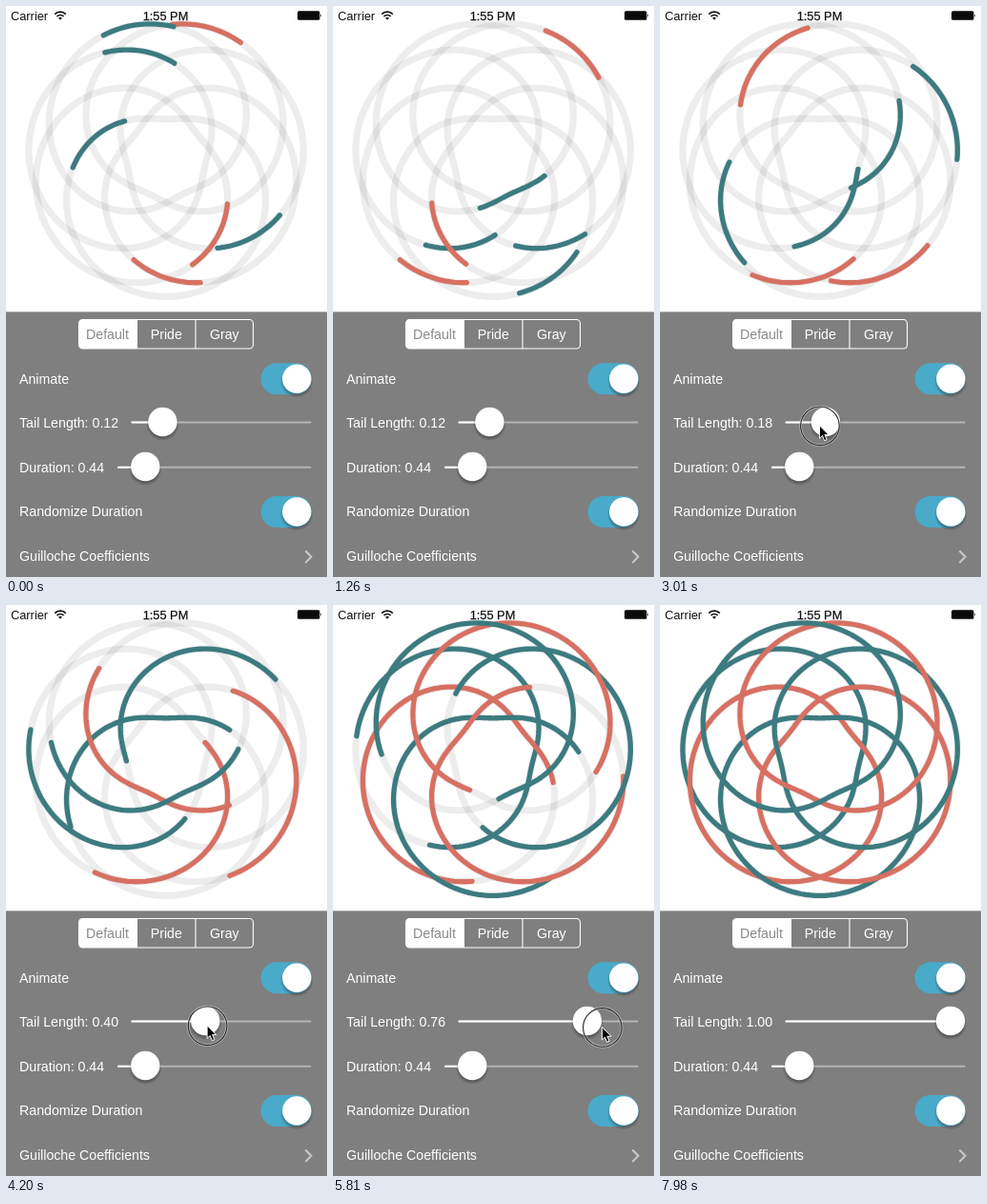
An HTML page for the animation above (8000 ms loop, 337 px wide and 600 px high).

```html
<!DOCTYPE html>
<html lang="en">
<head>
<meta charset="utf-8">
<title>Guilloche spinner</title>
<style>
  html, body { margin: 0; width: 100%; height: 100%; overflow: hidden; background: #fff; }
  svg { display: block; width: 337px; height: 600px; }
  text { font: 14.2px "Liberation Sans", Arial, sans-serif; fill: #fff; }
  .bar { font-size: 12.8px; fill: #111; }
  .mid { text-anchor: middle; }
  .base { fill: none; stroke: #000; stroke-opacity: .072; stroke-width: 7.2; }
  .tail { fill: none; stroke-width: 5.3; stroke-linecap: round; stroke-linejoin: round; }
  .track { stroke: #b5b5b5; stroke-width: 2.1; stroke-linecap: round; }
  .on { stroke: #fff; }
</style>
</head>
<body>
<svg viewBox="0 0 337 600">
  <defs>
    <radialGradient id="shade">
      <stop offset=".78" stop-opacity=".3"/>
      <stop offset="1" stop-opacity="0"/>
    </radialGradient>
    <g id="knob">
      <circle cy="2.6" r="17.5" fill="url(#shade)"/>
      <circle r="15.2" fill="#fff"/>
    </g>
    <g id="switch">
      <rect x="267.5" y="-16.5" width="53.5" height="33" rx="16.5" fill="#4aaac9"/>
      <use href="#knob" x="305.3"/>
    </g>
  </defs>

  <g id="rings"></g>
  <g id="tails"></g>

  <text class="bar" x="5" y="14.5">Carrier</text>
  <g fill="none" stroke="#111" stroke-width="1.7">
    <path d="M51.2 8.6a8.2 8.2 0 0 1 11.6 0M53.4 11a5.1 5.1 0 0 1 7.2 0"/>
    <path d="M57 14.8l-2-2.2a2.9 2.9 0 0 1 4 0z" fill="#111" stroke="none"/>
  </g>
  <text class="bar mid" x="167.5" y="14.5" stroke="#111" stroke-width=".25">1:55 PM</text>
  <rect x="306" y="5.3" width="23.4" height="9.4" rx="1.5" fill="#0a0a0a"/>
  <path d="M330.2 8.2q1.8 1.8 0 3.6z" fill="#111"/>

  <rect y="321.4" width="337" height="279" fill="#7f7f7f"/>
  <path d="M80.5 329.5H138V360H80.5a4 4 0 0 1-4-4V333.5a4 4 0 0 1 4-4z" fill="#fff"/>
  <rect x="76.5" y="329.5" width="183" height="30.5" rx="4" fill="none" stroke="#fff" stroke-width="1.1"/>
  <path d="M199 329.5V360" stroke="#fff" stroke-width="1.1"/>
  <text class="mid" x="106.5" y="350" style="fill:#8a8a8a">Default</text>
  <text class="mid" x="168.3" y="350">Pride</text>
  <text class="mid" x="229.3" y="350">Gray</text>

  <text x="14" y="396.7">Animate</text>
  <use href="#switch" y="391.7"/>

  <text id="label" x="14" y="443.2"></text>
  <path class="track" d="M132.5 437.5H319.5"/>
  <path id="fill" class="track on"/>
  <use id="thumb" href="#knob" y="437"/>

  <text x="14" y="489.7">Duration: 0.44</text>
  <path class="track" d="M118 484.7H319.5"/>
  <path class="track on" d="M118 484.7H146"/>
  <use href="#knob" x="146.3" y="484"/>

  <text x="14" y="536.4">Randomize Duration</text>
  <use href="#switch" y="531.5"/>

  <text x="14" y="583">Guilloche Coefficients</text>
  <path d="M314.3 572.5l6.2 6.3-6.2 6.3" fill="none" stroke="#c9c9c9" stroke-width="2"/>

  <g id="cursor">
    <g id="press" fill="none">
      <circle cx=".5" cy="-.5" r="20.3" stroke="#fff" stroke-width="2.6" stroke-opacity=".5"/>
      <circle cx=".5" cy="-.5" r="20.3" stroke="#222" stroke-width="1.1"/>
    </g>
    <path d="M0-1V12.6l3.1-2.9 2.2 5.2 2.4-1-2.2-5.1h4.2z" fill="#000" stroke="#fff"/>
  </g>
</svg>
<script>
const LOOP = 8000, STEP = 70;
const CX = 168.1, CY = 160.2, BASE = 93.3, SWING = 51.9;
const COLORS = ['#3c7b80', '#d77062'];

// Cursor enters, presses the slider, drags it, lets go and leaves.
const ENTER = 1260, PRESS = 2520, DRAG = 2650, RELEASE = 7100, LEAVE = 7300;

// Clockwise from the upper left: head position in laps, laps per second.
const LOBES = [
  { start: .115, speed: 1.097 },
  { start: .028, speed: 1.583 },
  { start: .275, speed: 1.56 },
  { start: .262, speed: 1.606 },
  { start: .431, speed: 1.923 },
  { start: -.249, speed: 1.686 },
  { start: .304, speed: 1.103 }
];

const $ = id => document.getElementById(id);

function set(el, attrs) {
  for (const k in attrs) el.setAttribute(k, attrs[k]);
  return el;
}

// Later lobes go underneath the earlier ones.
function addPath(parent, attrs) {
  const path = document.createElementNS('http://www.w3.org/2000/svg', 'path');
  parent.prepend(path);
  return set(path, attrs);
}

// A limaçon around the centre, starting at its outermost point.
function lobe(i) {
  const turn = (2 * i - 4.5) * Math.PI / 7, n = 180;
  const points = Array.from({ length: n }, (_, k) => {
    const a = 2 * Math.PI * k / n, r = BASE + SWING * Math.cos(a);
    return [CX + r * Math.cos(a + turn), CY + r * Math.sin(a + turn)]
      .map(v => v.toFixed(2)).join(' ');
  });
  return `M${points.join('L')}Z`;
}

const tails = LOBES.map((_, i) => {
  const d = lobe(i);
  addPath($('rings'), { d, class: 'base' });
  return addPath($('tails'), { d, class: 'tail', stroke: COLORS[i % 2], pathLength: 100 });
});

// The slider is dragged with a slight acceleration.
function tailLength(t) {
  const s = Math.max(0, t - DRAG) / 1000;
  return Math.min(1, .12 + .16 * s + .0136 * s * s);
}

// Seconds on the spinner's clock: a brisk start, later a slight drag.
function spinTime(t) {
  return (t + 53 * Math.min(1, t / 560) - .0143 * Math.max(0, t - 4200)) / 1000;
}

function drawTails(t, tail) {
  const time = spinTime(t);
  const dash = tail === 1 ? 'none' : `${tail * 100} ${(1 - tail) * 100}`;
  LOBES.forEach(({ start, speed }, i) => {
    const end = start + speed * time - tail;
    set(tails[i], {
      'stroke-dasharray': dash,
      'stroke-dashoffset': -100 * (end - Math.floor(end))
    });
  });
}

function drawSlider(tail) {
  const x = 145.3 + 159.7 * tail;
  $('label').textContent = 'Tail Length: ' + tail.toFixed(2);
  set($('fill'), { d: `M132.5 437.5H${x}` });
  set($('thumb'), { x });
}

function drawCursor(t, tail) {
  const left = Math.max(0, (PRESS - t) / (PRESS - ENTER));
  const x = 132 + 197.5 * tail + 189 * left + Math.max(0, t - RELEASE) * .08;
  const y = 441 + 4.5 * tail + 116 * left ** 3.5;
  set($('cursor'), {
    transform: `translate(${x} ${y})`,
    display: t >= ENTER && t < LEAVE ? 'inline' : 'none'
  });
  set($('press'), { display: t >= PRESS && t < RELEASE ? 'inline' : 'none' });
}

function draw(t) {
  const tail = tailLength(t);
  drawTails(t, tail);
  drawSlider(tail);
  drawCursor(t, tail);
}

const begin = performance.now();
function tick(now) {
  const t = Math.max(0, now - begin) % LOOP;
  draw(Math.floor(t / STEP) * STEP);
  requestAnimationFrame(tick);
}
draw(0);
requestAnimationFrame(tick);
</script>
</body>
</html>
```
